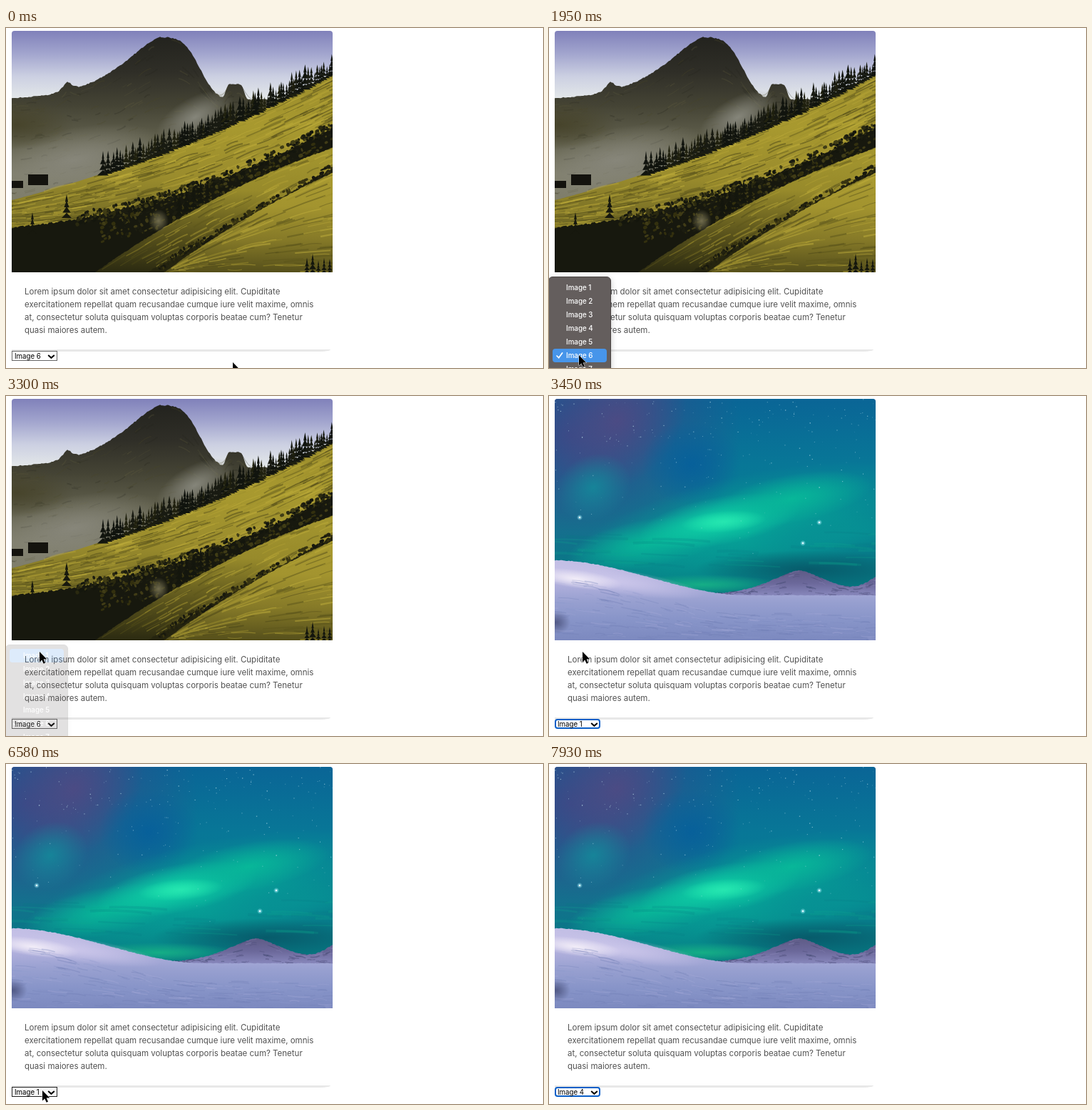
An HTML page with a canvas for the animation above (8000 ms loop, 753 px wide and 476 px high).

```html
<!DOCTYPE html>
<html lang="en">
<head>
<meta charset="utf-8">
<title>Image card</title>
<style>
html, body { margin: 0; width: 100%; height: 100%; overflow: hidden; background: #fff; }
body { position: relative; font-family: Inter, "Liberation Sans", sans-serif; }
body > * { position: absolute; box-sizing: border-box; }
canvas { left: 8px; top: 4px; border-radius: 4px 4px 0 0; }
#edge { left: 8px; top: 450px; width: 447px; height: 3px; background: #e8e8e8; border-radius: 0 0 14px 0 / 0 0 3px 0; }
#text { left: 26px; top: 360px; margin: 0; font-size: 11.5px; line-height: 18px; color: #525252; white-space: nowrap; }
#select { left: 8px; top: 452px; width: 64px; height: 14px; border: 1px solid #666; background: #fff; color: #000; font-size: 9.7px; line-height: 14px; }
#select span { position: absolute; left: 3px; top: -.5px; white-space: nowrap; }
#select svg { position: absolute; left: 49px; top: 4px; }
#select.hover { border-color: #222; background: #f6f6f6; }
#select.focus { border: 2px solid #0b5fc8; border-radius: 4px; background: #fff; }
#select.focus span { left: 2px; top: -1.5px; }
#select.focus svg { left: 48px; top: 3px; }
#menu { left: -1px; width: 88px; padding: 5px; border: 1px solid #4b4645; border-radius: 6px; background: #645e5d; box-shadow: 0 2px 8px rgba(0,0,0,.22); color: #fff; font-size: 9.8px; font-weight: 500; }
#menu div { position: relative; height: 19px; line-height: 19px; padding-left: 19px; border-radius: 4px; white-space: nowrap; }
#menu .on { background: #4795ea; }
#menu svg { position: absolute; left: 5px; top: 5px; display: none; }
#menu .checked svg { display: block; }
#cursor { left: 1px; top: 1px; overflow: visible; }
</style>
</head>
<body>
<canvas id="meadow" width="450" height="338"></canvas>
<canvas id="aurora" width="450" height="338"></canvas>
<div id="edge"></div>
<p id="text">Lorem ipsum dolor sit amet consectetur adipisicing elit. Cupiditate<br>exercitationem repellat quam recusandae cumque iure velit maxime, omnis<br>at, consectetur soluta quisquam voluptas corporis beatae cum? Tenetur<br>quasi maiores autem.</p>
<div id="select"><span></span><svg width="11" height="7"><path d="M1.2 1 5.5 4.8 9.8 1" fill="none" stroke="#000" stroke-width="2"/></svg></div>
<div id="menu"></div>
<svg id="cursor" width="12" height="18"><path d="M0 0V14.4L3.3 11.4 5.7 16.8 8 15.8 5.7 10.6H10.3Z" fill="#000" stroke="#fff" paint-order="stroke"/></svg>
<script>
const $ = id => document.getElementById(id);
const LEFT = 8, TOP = 4, RIGHT = 458, BOTTOM = 342;
const ease = u => u * u * (3 - 2 * u);
const clamp = u => Math.max(0, Math.min(1, u));
const hump = (x, mid, width, power) => Math.exp(-((Math.abs(x - mid) / width) ** power));

// Line between two points, sagging by bend in the middle
const bow = (x0, y0, x1, y1, bend) => x => {
  const u = (x - x0) / (x1 - x0);
  return y0 + (y1 - y0) * u + 4 * bend * u * (1 - u);
};

function random(seed) {
  return () => {
    seed = (seed + 0x6D2B79F5) | 0;
    let n = Math.imul(seed ^ seed >>> 15, 1 | seed);
    n = n + Math.imul(n ^ n >>> 7, 61 | n) ^ n;
    return ((n ^ n >>> 14) >>> 0) / 4294967296;
  };
}

// Brushes in stage coordinates
function painter(id, seed) {
  const c = $(id).getContext('2d');
  const rnd = random(seed);
  c.translate(-LEFT, -TOP);
  const range = (a, b) => a + (b - a) * rnd();
  const pick = list => list[Math.floor(rnd() * list.length)];

  function ramp(y0, y1, ...colors) {
    const g = c.createLinearGradient(0, y0, 0, y1);
    colors.forEach((color, i) => g.addColorStop(i / (colors.length - 1), color));
    return g;
  }
  function rect(x, y, w, h, fill) {
    c.fillStyle = fill;
    c.fillRect(x, y, w, h);
  }
  // Everything below a height function
  function land(top, fill, rough = 0) {
    c.beginPath();
    c.moveTo(RIGHT, BOTTOM);
    c.lineTo(LEFT, BOTTOM);
    for (let x = LEFT; x <= RIGHT; x += 2) c.lineTo(x, top(x) + range(-rough, rough));
    c.fillStyle = fill;
    c.fill();
  }
  function glow(x, y, rx, ry, turn, color) {
    c.save();
    c.translate(x, y);
    c.rotate(turn);
    c.scale(rx, ry);
    const g = c.createRadialGradient(0, 0, 0, 0, 0, 1);
    g.addColorStop(0, color);
    g.addColorStop(.4, color + 'a0');
    g.addColorStop(1, color + '00');
    rect(-1, -1, 2, 2, g);
    c.restore();
  }
  // Strokes that follow the band between two height functions
  function streaks(top, low, n, length, width, alpha, colors) {
    c.globalAlpha = alpha;
    for (let i = 0; i < n; i++) {
      const x = range(LEFT - length, RIGHT), l = range(.3, 1) * length, v = rnd();
      const at = px => top(px) + (low(px) - top(px)) * v;
      if (low(x) - top(x) < 2 || at(x) > BOTTOM) continue;
      c.beginPath();
      c.moveTo(x, at(x));
      c.quadraticCurveTo(x + l / 2, at(x + l / 2) + range(-3, 3), x + l, at(x + l) + l * .04);
      c.strokeStyle = pick(colors);
      c.lineWidth = range(.4, 1) * width;
      c.stroke();
    }
    c.globalAlpha = 1;
  }
  function conifer(x, base, h, fill) {
    c.fillStyle = fill;
    for (let i = 1; i <= 4; i++) {
      const y = base - h + h * i / 4, w = h * .06 * i * range(.8, 1.2);
      c.beginPath();
      c.moveTo(x, y - h * .4 + h * .04 * i);
      c.lineTo(x + w, y);
      c.lineTo(x - w, y);
      c.fill();
    }
  }
  // Clumps of short upright blades
  function scrub(line, x0, spread, n, colors) {
    for (let i = 0; i < n; i++) {
      const x = range(x0, RIGHT), y = line(x) + range(-1, 1) * spread;
      c.beginPath();
      c.ellipse(x, y, range(1, 3.5), range(1, 3), -.4, 0, 7);
      c.fillStyle = pick(colors);
      c.fill();
    }
  }
  return { c, range, pick, ramp, rect, land, glow, streaks, conifer, scrub };
}

function paintMeadow() {
  const p = painter('meadow', 11);
  const peak = x => hump(x, 215, ...(x < 215 ? [79, 1.4] : [63, 3.6]));
  const ridge = x => 100 - 87 * peak(x) - 13 * hump(x, 86, 9, 1.5) - 21 * hump(x, 321, 14, 6);
  const field = bow(8, 241, 458, 63, 16);
  const valley = bow(8, 279, 458, 139, 26);
  const bank = bow(125, 342, 458, 168, -15);
  const ravine = bow(200, 342, 458, 196, 0);
  const slope = bow(222, 342, 458, 203, -8);
  const floor = () => BOTTOM;
  const dark = '#17180e';
  const grass = ['#5b541b', '#c2b03c', '#9b8d2c', '#4a4518', '#b5a436'];

  p.rect(LEFT, TOP, 450, 338, p.ramp(4, 100, '#8081ba', '#a2a5ce', '#ccd0e2', '#e4e8e9'));
  p.land(ridge, p.ramp(13, 205, '#23231e', '#2f2e27', '#454435', '#62614e', '#7f7e6b'), .8);
  p.streaks(ridge, field, 260, 18, 2, .25, ['#25251c', '#64603f', '#4c4928']);
  p.glow(95, 185, 130, 45, -.2, '#87867a');
  p.glow(265, 125, 60, 28, -.5, '#85857a');
  p.glow(15, 135, 80, 35, 0, '#47442b');

  p.land(field, p.ramp(65, 280, '#9c8e2d', '#a8992f', '#9a8c2d', '#6d6523'));
  p.streaks(field, valley, 420, 50, 2.2, .5, grass);
  for (let x = 136; x < RIGHT; x += p.range(2.5, 5)) {
    p.conifer(x, field(x) + 3, p.range(15, 32), p.pick(['#11140e', '#191b12', '#20210f']));
  }

  p.land(valley, dark, 1.5);
  p.scrub(valley, 100, 9, 420, ['#1b1c10', '#2a2910', '#403d16', '#14160d']);
  p.scrub(x => valley(x) + 24, 130, 16, 320, ['#1b1c10', '#33300f', '#403c17']);
  p.land(bank, p.ramp(170, 342, '#a4962f', '#978a2b', '#5d561d', '#2b2a11'), .6);
  p.streaks(bank, ravine, 160, 40, 2.2, .45, grass);
  p.land(ravine, '#25240f', 2);
  p.scrub(ravine, 215, 6, 170, ['#22210f', '#383411', dark]);
  p.land(slope, p.ramp(203, 342, '#aa9b31', '#a3942f', '#867a28', '#554f1b'), .6);
  p.streaks(slope, floor, 230, 60, 2.4, .5, grass);

  for (let i = 0; i < 5; i++) {
    p.conifer(243 + 10 * i, 263 - 6 * i, p.range(20, 34), '#14160d');
    p.conifer(422 + 8 * i, 344, p.range(10, 30), '#14160d');
  }
  p.conifer(85, 266, 30, dark);
  p.conifer(37, 289, 28, dark);
  p.glow(214, 270, 14, 16, 0, '#716c4d');
  p.rect(31, 205, 28, 15, '#14130e');
  p.rect(LEFT, 214, 16, 10, '#14130e');
}

function paintAurora() {
  const p = painter('aurora', 29);
  const peaks = x => 279 - 35 * hump(x, 351, 60, 1.5) - 24 * hump(x, 462, 24, 1.5);
  const snow = x => 230 + 49 * ease(clamp((x - LEFT) / 270));
  const floor = () => BOTTOM;

  p.rect(LEFT, TOP, 450, 338, p.ramp(4, 280, '#0a6596', '#087797', '#077f90', '#07747d'));
  p.glow(30, 55, 240, 190, 0, '#354a88');
  p.glow(95, 35, 110, 85, -.8, '#4b4b84');
  p.glow(62, 128, 55, 45, -.5, '#168499');
  p.glow(200, 95, 70, 60, 0, '#07609a');

  // Curtain of light, brightest in the middle
  p.glow(280, 190, 270, 80, -.22, '#06a397');
  for (let i = 0; i < 3; i++) p.glow(140 + 100 * i, 206 - 31 * i, 115, 34, -.18, i === 1 ? '#10d8a8' : '#08b799');
  p.glow(245, 176, 60, 15, -.08, '#26e6b0');
  p.glow(395, 192, 120, 25, -.08, '#079194');
  p.glow(365, 243, 160, 27, 0, '#075b6b');
  p.glow(215, 264, 110, 14, 0, '#15ae86');
  p.streaks(() => 190, () => 238, 40, 95, 4, .2, ['#087a80', '#0bab8c']);

  for (let i = 0; i < 210; i++) {
    p.c.globalAlpha = p.range(.15, .75);
    const size = p.range(.6, 1.4);
    p.rect(p.range(LEFT, RIGHT), TOP + 220 * p.range(0, 1) * p.range(.2, 1), size, size, '#bfe4ee');
  }
  p.c.globalAlpha = 1;
  for (const [x, y] of [[43, 170], [356, 206], [379, 177]]) {
    p.glow(x, y, 4, 4, 0, '#9ee8f4');
    p.rect(x - 1, y - 1, 2, 2, '#e4fbff');
  }

  p.land(peaks, p.ramp(244, 280, '#5e5b86', '#6b689a', '#8888bd'), .6);
  p.streaks(peaks, () => 279, 200, 14, 1.8, .45, ['#41466f', '#8785b5', '#4d4d79']);
  p.land(snow, p.ramp(232, 342, '#c3bfe5', '#b4b2de', '#98a0d0', '#8794c8', '#7c89bf'), .4);
  p.glow(80, 257, 140, 18, .15, '#cdc8eb');
  p.glow(38, 256, 65, 13, .13, '#f2edf8');
  p.streaks(x => snow(x) + 25, floor, 270, 32, 1.5, .35, ['#7583ba', '#a8add9', '#8d99cb', '#6d7ab2']);
  p.glow(10, 317, 20, 16, 0, '#525a86');
}

const TICK = 150;
const glides = [
  { at: 0, steps: 1, from: [317, 467], to: [317, 467] },
  { at: 150, steps: 1, from: [317, 467], to: [318, 490] },
  { at: 450, steps: 5, from: [349, 472], to: [41, 457] },
  { at: 2250, steps: 6, from: [41, 457], to: [46, 357] },
  { at: 3750, steps: 6, from: [46, 357], to: [50, 457] },
  { at: 4940, steps: 1, from: [50, 457], to: [48, 481] },
  { at: 5680, steps: 4, from: [46, 478], to: [50, 456] },
  { at: 7030, steps: 3, from: [50, 456], to: [50, 484] }
];
const menus = [
  { open: 1800, fade: 3300, close: 3450, checked: 6, top: 348 },
  { open: 4940, fade: 5090, close: 5090, checked: 1, top: 443 },
  { open: 6730, fade: 7780, close: 7930, checked: 1, top: 443 }
];
const rings = [[3450, 4940], [5090, 6580], [7930, 8000]];

function pointer(t) {
  const { at, steps, from, to } = glides.filter(g => t >= g.at).pop();
  const e = ease(clamp((Math.floor((t - at) / TICK) + 1) / steps));
  return from.map((v, i) => Math.round(v + (to[i] - v) * e));
}

const tick = '<svg width="10" height="9"><path d="M1 5 3.7 7.7 8.6 1" fill="none" stroke="#fff" stroke-width="1.7" stroke-linecap="round"/></svg>';
$('menu').innerHTML = Array.from({ length: 8 }, (_, i) => `<div>${tick}Image ${i + 1}</div>`).join('');
const items = [...$('menu').children];

function show(t) {
  const [x, y] = pointer(t);
  $('cursor').style.transform = `translate(${x}px, ${y}px)`;
  $('aurora').style.visibility = t >= 3450 ? 'visible' : 'hidden';

  const value = t < 3450 ? 6 : t < 7930 ? 1 : 4;
  const focus = rings.some(([a, b]) => t >= a && t < b);
  const hover = x >= 8 && x < 72 && y >= 452 && y < 466;
  $('select').className = focus ? 'focus' : hover ? 'hover' : '';
  $('select').firstChild.textContent = 'Image ' + value;

  const m = menus.find(m => t >= m.open && t < m.close);
  $('menu').style.display = m ? 'block' : 'none';
  if (!m) return;
  $('menu').style.top = m.top + 'px';
  $('menu').style.opacity = t >= m.fade ? .18 : 1;
  const over = Math.floor((y - m.top - 6) / 19);
  items.forEach((el, i) => {
    el.className = (i === over ? 'on ' : '') + (i + 1 === m.checked ? 'checked' : '');
  });
}

paintMeadow();
paintAurora();
const start = performance.now();
function loop() {
  show((performance.now() - start) % 8000);
  requestAnimationFrame(loop);
}
loop();
</script>
</body>
</html>
```
